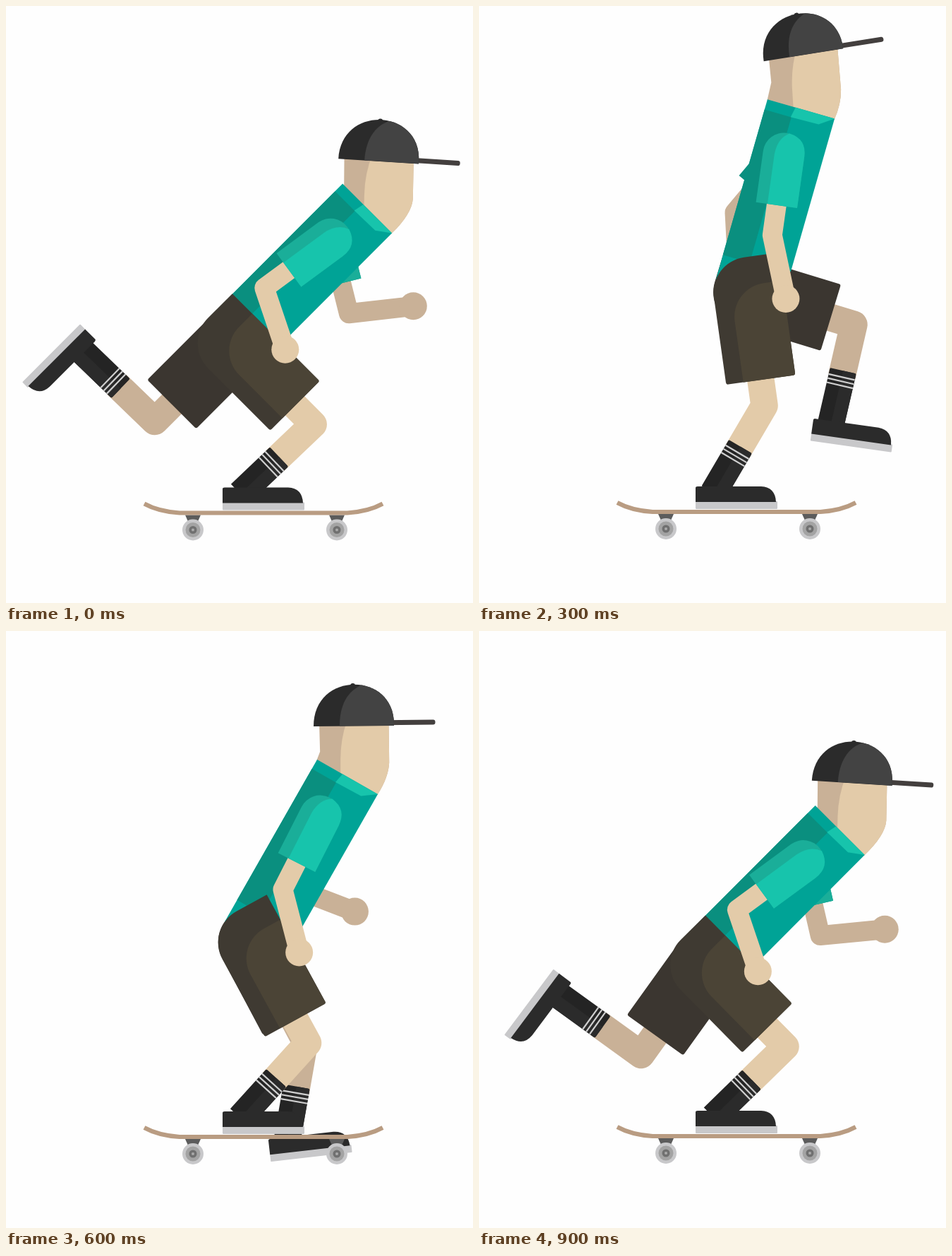
An HTML page with a canvas that plays this animation: 662x845 px, repeating every 1000 ms.

```html
<!DOCTYPE html>
<html lang="en">
<head>
<meta charset="utf-8">
<title>Skater</title>
<style>
  html, body { margin: 0; width: 100%; height: 100%; overflow: hidden; background: #fefefe; }
  canvas { display: block; }
</style>
</head>
<body>
<canvas id="stage" width="662" height="845"></canvas>
<script>
const ctx = document.getElementById('stage').getContext('2d');
const STEP = 100, COUNT = 10;

// Joint angles in degrees, one value per step; 0 hangs straight down.
const tracks = {
  drop:      [1.5, .5, -1, 0, 0, 0, 0, 0, 0, -1],
  torso:     [45, 41, 23.7, 16, 12.2, 18.5, 29.7, 41.3, 44, 45],
  thigh:     [-45, -40.3, -20.7, -8, 0, -13, -28.7, -40.3, -43.7, -44.6],
  shin:      [46.5, 46, 39, 30.5, 24.8, 33, 42.2, 46, 46, 45.8],
  arm:       [53.7, 47.2, 22.3, 8, -1, 11, 27, 43, 50, 53.7],
  forearm:   [-18.7, -17.7, -18.2, -12, -8, -10, -14.6, -12.2, -16, -18.7],
  farThigh:  [45, 1.8, -51, -73, -82, -60, -28, -15.3, 12, 35.7],
  farShin:   [134, 114.4, 48.9, 13, -10.6, -4, 10, 59.5, 95, 125.8],
  farFoot:   [135, 106.4, 38.4, 8, -11, -11, -6.5, 44.6, 88, 126.8],
  farArm:    [-14, .5, 36, 40, 39.4, 32, 19.8, .5, -8, -13],
  farFore:   [-96.5, -89, -37.6, -3, 19.6, -28, -69, -89, -93, -95.5],
  cap:       [3.6, 5.3, -4, -9, -12.2, -7, -.5, 5.4, 4.5, 3.7],
  capX:      [16, 19, 5.5, 3.5, 2.5, 5, 9, 19, 18, 17]
};

const skin = '#e3cba9', farSkin = '#c9b197';
const black = '#2b2b2b', grey = '#c8c8ca';
const teal = '#00a396', deepTeal = '#0a8f7f', midTeal = '#1aae99', mint = '#17c4ac';

// Point at local (x, y) of a frame placed at p and turned by deg.
function at(p, deg, x, y) {
  const a = deg * Math.PI / 180, c = Math.cos(a), s = Math.sin(a);
  return [p[0] + x * c - y * s, p[1] + x * s + y * c];
}

function local(p, deg, draw) {
  ctx.save();
  ctx.translate(p[0], p[1]);
  ctx.rotate(deg * Math.PI / 180);
  draw();
  ctx.restore();
}

function poly(color, ...pts) {
  ctx.beginPath();
  pts.forEach(p => ctx.lineTo(p[0], p[1]));
  ctx.fillStyle = color;
  ctx.fill();
}

function box(color, x, y, w, h, r = 0) {
  ctx.beginPath();
  ctx.roundRect(x, y, w, h, r);
  ctx.fillStyle = color;
  ctx.fill();
}

function disc(color, x, y, r) {
  ctx.beginPath();
  ctx.arc(x, y, r, 0, 7);
  ctx.fillStyle = color;
  ctx.fill();
}

function limb(color, width, ...pts) {
  ctx.beginPath();
  pts.forEach(p => ctx.lineTo(p[0], p[1]));
  ctx.lineWidth = width;
  ctx.lineJoin = 'round';
  ctx.strokeStyle = color;
  ctx.stroke();
}

function shoe(ankle, deg) {
  local(ankle, deg, () => {
    box(grey, -25, 12, 116, 11, 1);
    ctx.beginPath();
    ctx.moveTo(-25, 13);
    ctx.lineTo(-25, -7);
    ctx.quadraticCurveTo(-25, -9, -22, -9);
    ctx.lineTo(68, -9);
    ctx.quadraticCurveTo(88, -8, 89, 13);
    ctx.fillStyle = black;
    ctx.fill();
  });
}

function sock(knee, deg, end) {
  local(knee, deg, () => {
    box('#242424', -19, 67, 38, end - 67, [2, 2, 0, 0]);
    box(black, 0, 67, 19, end - 67, [0, 2, 0, 0]);
    for (let i = 0; i < 3; i++) box('#cfcfcf', -19, 75 + i * 6, 38, 2.2);
  });
}

function arm(shoulder, upper, lower, reach, color) {
  const elbow = at(shoulder, upper, 0, reach);
  const hand = at(elbow, lower, 0, 92);
  limb(color, 28, at(shoulder, upper, 0, 45), elbow, hand);
  disc(color, hand[0], hand[1], 19.5);
}

function farSleeve(shoulder, deg) {
  local(shoulder, deg, () => {
    box(deepTeal, -29, -29, 58, 93, [29, 29, 0, 0]);
    box(midTeal, 0, -29, 29, 93, [0, 29, 0, 0]);
  });
}

function sleeve(shoulder, deg) {
  local(shoulder, deg, () => {
    box(midTeal, -29.5, -30, 59, 103, [29.5, 29.5, 0, 0]);
    ctx.beginPath();
    ctx.moveTo(-13, 73);
    ctx.lineTo(-13, 2);
    ctx.quadraticCurveTo(-12, -21, 4, -30);
    ctx.quadraticCurveTo(29.5, -26, 29.5, 0);
    ctx.lineTo(29.5, 73);
    ctx.fillStyle = mint;
    ctx.fill();
  });
}

function farLeg(hip, k) {
  const knee = at(hip, k.farThigh, 0, 156);
  const ankle = at(knee, k.farShin, 0, 149);
  limb(farSkin, 39, at(hip, k.farThigh, 0, 100), knee, at(knee, k.farShin, 0, 75));
  sock(knee, k.farShin, 149);
  shoe(ankle, k.farFoot);
  local(hip, k.farThigh, () => box('#3b3630', -49, -50, 98, 172, [49, 0, 3, 3]));
}

function nearLeg(hip, knee, ankle, k) {
  limb(skin, 38.5, at(hip, k.thigh, 0, 100), knee, at(knee, k.shin, 0, 75));
  sock(knee, k.shin, 143);
  shoe(ankle, 0);
  local(hip, k.thigh, () => {
    box('#3f3a32', -49.5, -50, 99, 175, [50, 0, 3, 3]);
    box('#4b4436', -25, -10, 74.5, 135, [48, 0, 3, 0]);
  });
}

function board(y) {
  for (const x of [265, 469]) {
    poly('#5c5c5c', [x - 11, y + 3], [x + 11, y + 3], [x + 7, y + 12], [x - 7, y + 12]);
    disc(grey, x, y + 24, 15);
    disc('#a3a3a3', x, y + 24, 10.5);
    disc('#707070', x, y + 24, 5.5);
    disc('#a9a9a9', x, y + 24, 2);
  }
  ctx.beginPath();
  ctx.moveTo(196, y - 13);
  ctx.quadraticCurveTo(216, y - 2, 246, y);
  ctx.lineTo(484, y);
  ctx.quadraticCurveTo(514, y - 2, 534, y - 13);
  ctx.lineWidth = 6;
  ctx.strokeStyle = '#b99c82';
  ctx.stroke();
}

function head(hip, k) {
  const neck = at(hip, k.torso, 0, -270);
  const left = at(hip, k.torso, -49.5, -269), right = at(hip, k.torso, 49.5, -269);
  const top = [neck[0] + k.capX, neck[1] - 82 + .34 * k.torso];
  const tilt = k.cap * .4;
  ctx.save();
  ctx.beginPath();
  ctx.moveTo(...at(top, k.cap, -49, -6));
  ctx.lineTo(...at(top, k.cap, 49.5, -6));
  ctx.lineTo(...at(top, tilt, 50, 52));
  ctx.quadraticCurveTo(...at(top, tilt, 49, 73), ...right);
  ctx.lineTo(...at(hip, k.torso, 0, -250));
  ctx.lineTo(...left);
  ctx.lineTo(...at(top, tilt, -48, 36));
  ctx.closePath();
  ctx.fillStyle = farSkin;
  ctx.fill();
  ctx.clip();
  local(top, tilt, () => {
    ctx.beginPath();
    ctx.moveTo(-8, -12);
    ctx.quadraticCurveTo(-19, 16, -19, 48);
    ctx.lineTo(-19, 130);
    ctx.lineTo(80, 130);
    ctx.lineTo(80, -30);
    ctx.fillStyle = skin;
    ctx.fill();
  });
  ctx.restore();
  local(top, k.cap, () => {
    box('#433f3e', 40, -8, 75.5, 7, 3);
    disc(black, -1, -57, 3.5);
    ctx.beginPath();
    ctx.moveTo(-57, 0);
    ctx.bezierCurveTo(-57, -78, 57, -78, 57, -3);
    ctx.lineTo(57, 0);
    ctx.fillStyle = black;
    ctx.fill();
    ctx.clip();
    ctx.beginPath();
    ctx.moveTo(-20, 0);
    ctx.bezierCurveTo(-20, -28, -10, -50, 14, -59);
    ctx.lineTo(60, -59);
    ctx.lineTo(60, 0);
    ctx.fillStyle = '#434343';
    ctx.fill();
  });
}

function shirt(hip, deg) {
  local(hip, deg, () => {
    poly(teal, [-49.5, -270], [49.5, -270], [49.5, -45], [0, -5], [-49.5, -5]);
    box(deepTeal, -49.5, -255, 39.5, 214);
    poly(mint, [-8, -270], [49.5, -270], [30, -256], [-11, -255]);
  });
}

function draw(i) {
  const k = {};
  for (const name in tracks) k[name] = tracks[name][i];
  // The standing foot stays put, so the body is built up from the ankle.
  const ankle = [332, 689 + k.drop];
  const knee = at(ankle, k.shin, 0, -143);
  const hip = at(knee, k.thigh, 0, -162);
  const shoulder = at(hip, k.torso, -6, -202);

  ctx.fillStyle = '#fefefe';
  ctx.fillRect(0, 0, 662, 845);
  arm(shoulder, k.farArm, k.farFore, 108, farSkin);
  farSleeve(shoulder, k.farArm);
  farLeg(hip, k);
  board(716 + k.drop);
  head(hip, k);
  shirt(hip, k.torso);
  nearLeg(hip, knee, ankle, k);
  arm(shoulder, k.arm, k.forearm, 116, skin);
  sleeve(shoulder, k.arm);
}

const start = performance.now();
function tick() {
  draw(Math.floor((performance.now() - start) / STEP) % COUNT);
  requestAnimationFrame(tick);
}
tick();
</script>
</body>
</html>
```
